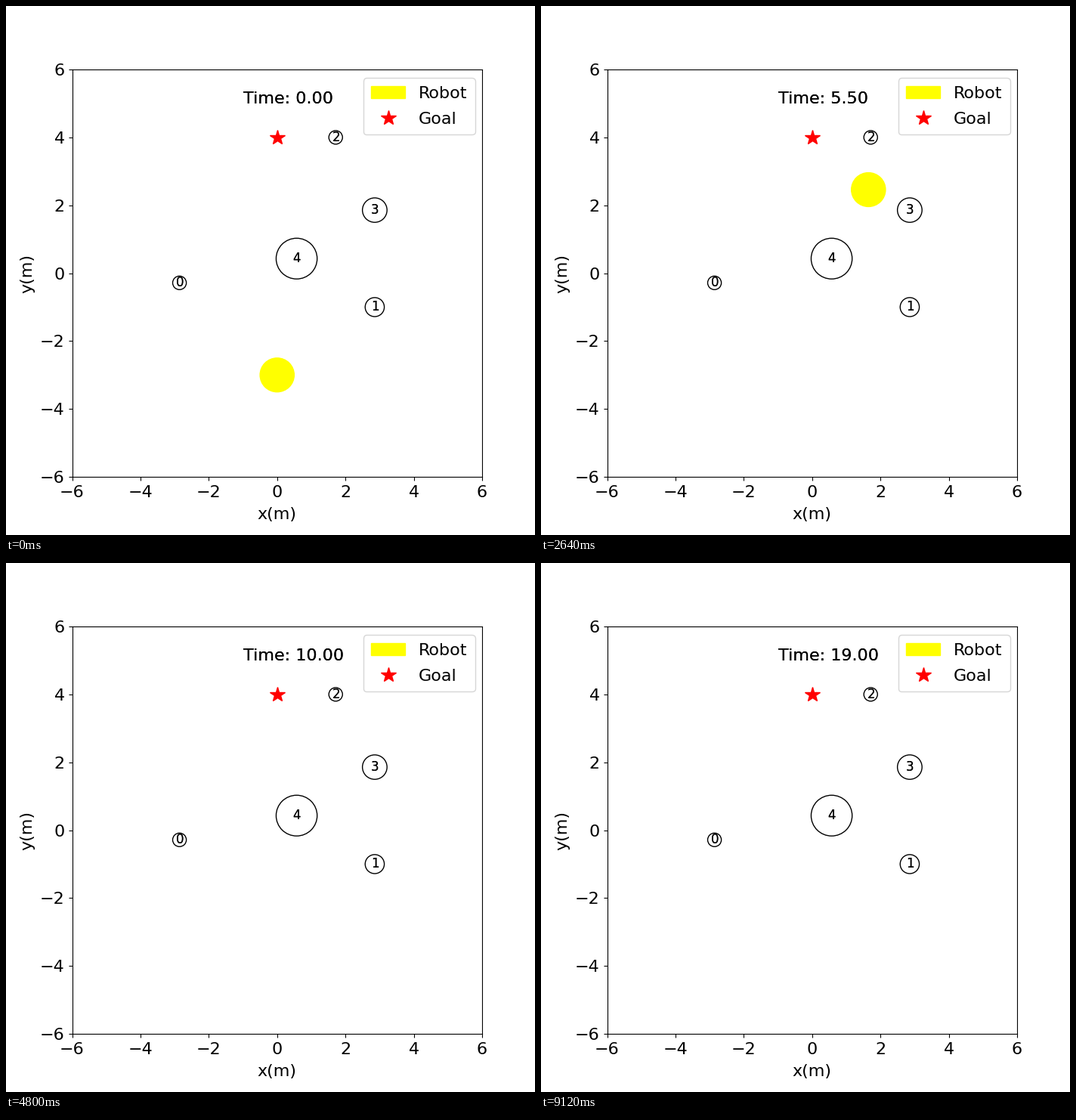
A matplotlib script that plays this animation: 700 by 700 pixels, repeating every 9.24 s.

```python
import numpy as np
import matplotlib.pyplot as plt
from matplotlib.animation import FuncAnimation
from matplotlib.lines import Line2D

FRAMES = 77
INTERVAL = 120
DT = 0.25

# robot waypoints: step, x, y; it leaves the axes after the last one
KEYS = np.array([
    (0, 0, -3), (4, 0.35, -2.985), (8, 1.249, -2.602), (10, 1.808, -1.904),
    (12, 1.93, -1.14), (16, 1.979, 0.226), (22, 1.649, 2.46),
    (24, 1.78, 2.764), (33, 4.595, 2.783), (39, 6.87, 2.486),
])
STEPS, POINTS = KEYS[:, 0], KEYS[:, 1:]
SPEEDS = np.gradient(POINTS, STEPS, axis=0)

# static obstacles: x and y in sevenths of a metre, radius in metres
OBSTACLES = [(-20, -2, 0.2), (20, -7, 0.28), (12, 28, 0.2),
             (20, 13, 0.36), (4, 3, 0.6)]


def robot_at(step):
    """Smooth (cubic Hermite) position along the waypoints."""
    step = min(step, STEPS[-1])
    i = min(np.searchsorted(STEPS, step, side="right") - 1, len(STEPS) - 2)
    span = STEPS[i + 1] - STEPS[i]
    s = (step - STEPS[i]) / span
    blend = s * s * (3 - 2 * s)
    return (POINTS[i] * (1 - blend) + POINTS[i + 1] * blend
            + span * s * (1 - s) * ((1 - s) * SPEEDS[i] - s * SPEEDS[i + 1]))


def double_text(x, y, label, size):
    """Text drawn twice in place, which darkens its edges."""
    return [ax.text(x, y, label, fontsize=size, color="black")
            for _ in range(2)]


plt.rcParams["font.family"] = "DejaVu Sans"
fig, ax = plt.subplots(figsize=(7, 7), dpi=100)
fig.subplots_adjust(left=0.125, right=0.9, bottom=0.11, top=0.88)
ax.tick_params(labelsize=16)
ax.tick_params(axis="x", pad=4.5)
ax.set_xlim(-6, 6)
ax.set_ylim(-6, 6)
ax.set_xlabel("x(m)", fontsize=16, labelpad=6.5)
ax.set_ylabel("y(m)", fontsize=16, labelpad=4.7)

robot = plt.Circle(POINTS[0], 0.5, fill=True, color="yellow")
goal = Line2D([0], [4], color="red", marker="*", linestyle="None",
              markersize=15)
ax.add_artist(robot)
ax.add_artist(goal)
ax.legend([robot, goal], ["Robot", "Goal"], fontsize=16, loc="upper right",
          bbox_to_anchor=(1.003, 1), borderpad=0.47, labelspacing=0.635)

for i, (x, y, r) in enumerate(OBSTACLES):
    x, y = x / 7, y / 7
    ax.add_artist(plt.Circle((x, y), r, fill=False))
    double_text(x - 0.11, y - 0.11, str(i), 12)

clock = double_text(-1, 5, "Time: 0.00", 16)


def update(frame):
    robot.center = tuple(robot_at(frame))
    for label in clock:
        label.set_text(f"Time: {frame * DT:.2f}")
    return [robot, *clock]


anim = FuncAnimation(fig, update, frames=FRAMES, interval=INTERVAL,
                     repeat=True, repeat_delay=0, blit=False)
plt.show()
```
